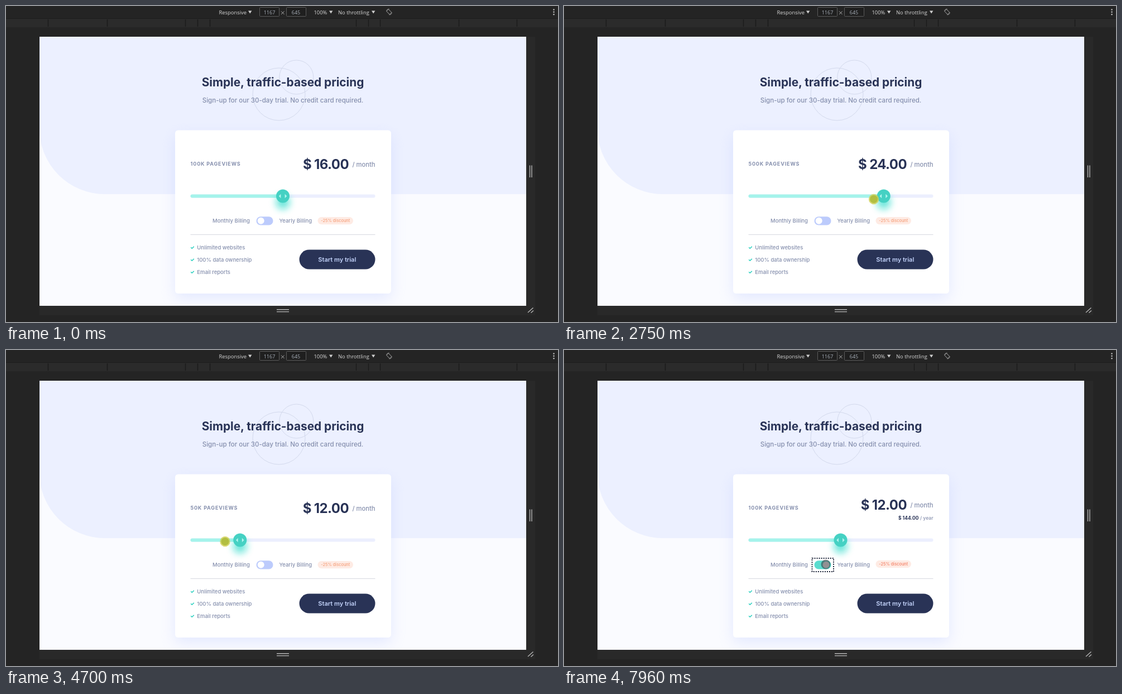
Animation, 989 px wide and 566 px high, one loop 8000 ms. Source, as an HTML page:

```html
<!DOCTYPE html>
<html lang="en">
<head>
<meta charset="utf-8">
<title>Pricing slider</title>
<style>
  html, body { margin: 0; width: 100%; height: 100%; overflow: hidden; background: #242424; }
  svg { display: block; }
  text { font-family: Inter, sans-serif; white-space: pre; }
  .bar text { font-family: "Open Sans", "Noto Sans", sans-serif; font-size: 9.4px; fill: #d6d6d6; }
  .bar .num { font-size: 9px; fill: #a9b0ba; text-anchor: middle; }
  .soft { fill: #858fad; font-weight: 500; }
  .item { font-size: 9.5px; }
  .dark { fill: #293356; font-weight: 700; }
  .mid { text-anchor: middle; }
  .end { text-anchor: end; }
</style>
</head>
<body>
<svg width="989" height="566" viewBox="0 0 989 566">
  <defs>
    <filter id="cardBlur" x="-20%" y="-20%" width="140%" height="140%"><feGaussianBlur stdDeviation="13"/></filter>
    <filter id="knobBlur" x="-150%" y="-150%" width="400%" height="400%"><feGaussianBlur stdDeviation="6.5"/></filter>
    <clipPath id="page"><rect x="60" y="55" width="872" height="482"/></clipPath>
  </defs>

  <rect width="989" height="566" fill="#242424"/>
  <g class="bar">
    <rect y="22" width="989" height="16" fill="#2b2b2b"/>
    <path d="M0 22.5H989" stroke="#1c1c1c"/>
    <path id="ticks" stroke="#1b1b1b" stroke-width="1.4"/>
    <text x="381.5" y="15">Responsive</text>
    <text x="551.5" y="15">100%</text>
    <text x="595" y="15">No throttling</text>
    <path d="M434 8.5h6.4l-3.2 5zM579 8.5h6.4l-3.2 5zM655 8.5h6.4l-3.2 5z" fill="#cfcfcf"/>
    <g fill="#1f1f1f" stroke="#5c5c5c">
      <rect x="454.5" y="2.5" width="35" height="16" rx="1"/>
      <rect x="502.5" y="2.5" width="35" height="16" rx="1"/>
    </g>
    <text class="num" x="472" y="15">1167</text>
    <text class="num" x="519.5" y="15">645</text>
    <path d="M493 9.5l5.5 5.5m0-5.5l-5.5 5.5" stroke="#a8a8a8"/>
    <g fill="none" stroke="#8d8d8d">
      <rect x="683.8" y="6.3" width="5" height="8.4" rx="1" transform="rotate(-45 686.3 10.5)"/>
      <path d="M681.6 9.5a5.2 5.2 0 0 1 5-4.4M691.4 11.5a5.2 5.2 0 0 1-5 4.4"/>
    </g>
    <g fill="#bdbdbd">
      <circle cx="981.5" cy="6.5" r="1.3"/><circle cx="981.5" cy="10.8" r="1.3"/><circle cx="981.5" cy="15.1" r="1.3"/>
    </g>
  </g>

  <path d="M932 55h16v499H60v-17H932z" fill="#292929"/>
  <path d="M938.5 285.5v21.500M942 285.500v21.500M485 543.800h22M485 547.600h22M935 549l9.500-8.500M940.500 549.500l4.500-4" stroke="#b5b5b5" stroke-width="1.4"/>

  <g clip-path="url(#page)">
    <rect x="60" y="55" width="872" height="482" fill="#fafbff"/>
    <path d="M60 55H932V337H177A117 117 0 0 1 60 220z" fill="#ecf0ff"/>
    <g fill="none" stroke="#d3d9ec">
      <circle cx="489" cy="158" r="47"/><circle cx="520.3" cy="127.500" r="30.500"/>
    </g>
    <text class="dark mid" x="496" y="143.500" font-size="20.800">Simple, traffic-based pricing</text>
    <text class="soft mid" x="496" y="173.300" font-size="11.550">Sign-up for our 30-day trial. No credit card required.</text>

    <rect x="303" y="232" width="387" height="292" rx="6" fill="#b4c2ff" opacity=".32" filter="url(#cardBlur)"/>
    <rect x="303" y="222.500" width="387" height="292.500" rx="5.500" fill="#fff"/>

    <text id="views" x="330.500" y="286" class="soft" style="font-weight:700" font-size="9" letter-spacing=".85"></text>
    <g id="priceRow">
      <text id="price" class="dark end" x="614" y="292.300" font-size="24" letter-spacing="-.6"></text>
      <text class="soft end" x="661.500" y="288.300" font-size="11.200">/ month</text>
    </g>
    <g id="yearRow">
      <text id="yearPrice" class="dark end" x="635.500" y="304" font-size="8.500"></text>
      <text class="soft end" x="661.500" y="304" font-size="8.600">/ year</text>
    </g>

    <rect x="330.500" y="337.500" width="331" height="6" rx="3" fill="#eceffe"/>
    <rect id="fill" x="330.500" y="337.500" height="6" rx="3" fill="#a5f3eb"/>
    <g id="handle">
      <circle cy="11" r="12.500" fill="#10d5c2" opacity=".62" filter="url(#knobBlur)"/>
      <circle r="12" fill="#45d1c3"/>
      <path d="M-3.600-3.800v7.600L-7.200 0zM3.600-3.800v7.600L7.200 0z" fill="#b2f6ef"/>
    </g>

    <text class="soft item" x="370" y="388">Monthly Billing</text>
    <text class="soft item" x="489.500" y="388">Yearly Billing</text>
    <rect id="focus" x="444.500" y="373" width="38.500" height="24" fill="none" stroke="#1d2338" stroke-width="2" stroke-dasharray="2 2.030"/>
    <rect id="toggle" x="448.500" y="377.300" width="30" height="15.200" rx="7.600"/>
    <circle id="knob" cy="384.800" r="6" fill="#fff"/>
    <g id="badge">
      <rect x="558.500" y="378" width="63.500" height="13.200" rx="6.600" fill="#feebe4"/>
      <text id="badgeText" class="mid" x="590.300" y="387.400" font-size="7.400" font-weight="500">-25% discount</text>
    </g>

    <path d="M330.500 409.500H661.500" stroke="#d6d9e0"/>
    <g id="list"></g>
    <rect x="525.500" y="436.500" width="136" height="35" rx="17.500" fill="#293356"/>
    <text class="mid" x="593.300" y="458" font-size="11" font-weight="600" fill="#c3d3fb">Start my trial</text>
  </g>

  <circle id="pointer" r="8" fill="#3c363c" stroke="#2c282c"/>
  <g id="press">
    <circle r="9.200" fill="#cfcf52" opacity=".8"/>
    <circle r="7" fill="#aebb3c" opacity=".9"/>
  </g>
</svg>
<script>
const LOOP = 8000, DOWN = 1880, UP = 5740, SWITCH = 6210;
const MIN_X = 342.5, MAX_X = 649.5;
const plans = [['10K', 8], ['50K', 12], ['100K', 16], ['500K', 24], ['1M', 36]];

// time, x, y of the pointer
const path = [
  [270, 928, 513], [700, 650, 400], [930, 561, 290], [1060, 590, 362], [1130, 590, 369],
  [1420, 516, 360], [1620, 498, 340], [1880, 498, 340.5], [2010, 523, 340.5], [2540, 523, 341],
  [2750, 555, 346], [3010, 556, 346], [3210, 642, 345], [3490, 642, 345], [3850, 545, 346],
  [4170, 481, 346], [4300, 479, 346], [4600, 415, 344], [4910, 346, 341], [5110, 346, 340],
  [5400, 469, 340], [5600, 492, 341], [5800, 465, 378], [5940, 465, 379], [6070, 466, 385],
  [6500, 467, 385], [6600, 469, 387.5], [6800, 514, 418], [7000, 514, 418], [7350, 490, 404],
  [7750, 469, 384]
];

const $ = id => document.getElementById(id);
const set = (id, attrs) => { for (const k in attrs) $(id).setAttribute(k, attrs[k]); };
const write = (id, s) => { if ($(id).textContent !== s) $(id).textContent = s; };
const clamp = v => Math.max(0, Math.min(1, v));
const mix = (a, b, k) => a + (b - a) * k;
const money = n => '$ ' + n.toFixed(2);

function pointerAt(t) {
  const i = path.findIndex(p => p[0] > t);
  if (i < 0) return path[path.length - 1].slice(1);
  if (i === 0) return path[0].slice(1);
  const a = path[i - 1], b = path[i], k = (t - a[0]) / (b[0] - a[0]);
  return [mix(a[1], b[1], k), mix(a[2], b[2], k)];
}

function planAt(t) {
  if (t < DOWN || t > UP) return 2;
  return Math.round(4 * clamp((pointerAt(t)[0] - MIN_X) / (MAX_X - MIN_X)));
}

function pointerOpacity(t, x, y) {
  if (t < 270 || (t >= DOWN && t < UP)) return 0;
  if (t < DOWN) return 0.03;
  const away = clamp((Math.hypot(x - 469, y - 385) - 4) / 14);
  return mix(0.55, 0.06, away);
}

function draw(t) {
  const [x, y] = pointerAt(t);
  const plan = planAt(t), yearly = t >= SWITCH;
  const [views, base] = plans[plan];
  const hx = mix(MIN_X, MAX_X, plan / 4) - (yearly ? 0.5 : 0);
  const month = yearly ? base * 0.75 : base;

  write('views', views + ' PAGEVIEWS');
  write('price', money(month));
  write('yearPrice', money(month * 12));
  set('priceRow', { transform: `translate(0 ${yearly ? -6.6 : 0})` });
  set('yearRow', { visibility: yearly ? 'visible' : 'hidden' });
  set('fill', { width: hx - 330.5 });
  set('handle', { transform: `translate(${hx} 340.5)` });

  set('toggle', { fill: yearly ? '#5adccf' : '#bccbfc' });
  set('knob', { cx: yearly ? 469.6 : 456.7 });
  set('focus', { visibility: yearly ? 'visible' : 'hidden' });

  const lift = clamp((t - 7550) / 410);
  set('badge', { transform: `translate(0 ${-1.3 * lift})` });
  set('badgeText', { fill: `rgb(${mix(246, 244, lift)},${mix(160, 128, lift)},${mix(124, 102, lift)})` });

  const at = `translate(${x} ${y})`;
  set('pointer', { transform: at, opacity: pointerOpacity(t, x, y) });
  set('press', { transform: at, visibility: t >= DOWN && t < UP ? 'visible' : 'hidden' });
}

set('ticks', { d: [75, 181, 321, 343, 365, 627, 649, 670, 811, 915].map(x => `M${x + 0.5} 24V37`).join('') });
$('list').innerHTML = ['Unlimited websites', '100% data ownership', 'Email reports'].map((s, i) => {
  const y = 432.3 + i * 22;
  return `<path d="M331.2 ${y}l2 2 3.600-3.600" fill="none" stroke="#27cfbf" stroke-width="1.500"/>` +
    `<text class="soft item" x="342.300" y="${y + 3.2}">${s}</text>`;
}).join('');

const start = performance.now();
function tick() {
  draw((performance.now() - start) % LOOP);
  requestAnimationFrame(tick);
}
draw(0);
requestAnimationFrame(tick);
</script>
</body>
</html>
```
